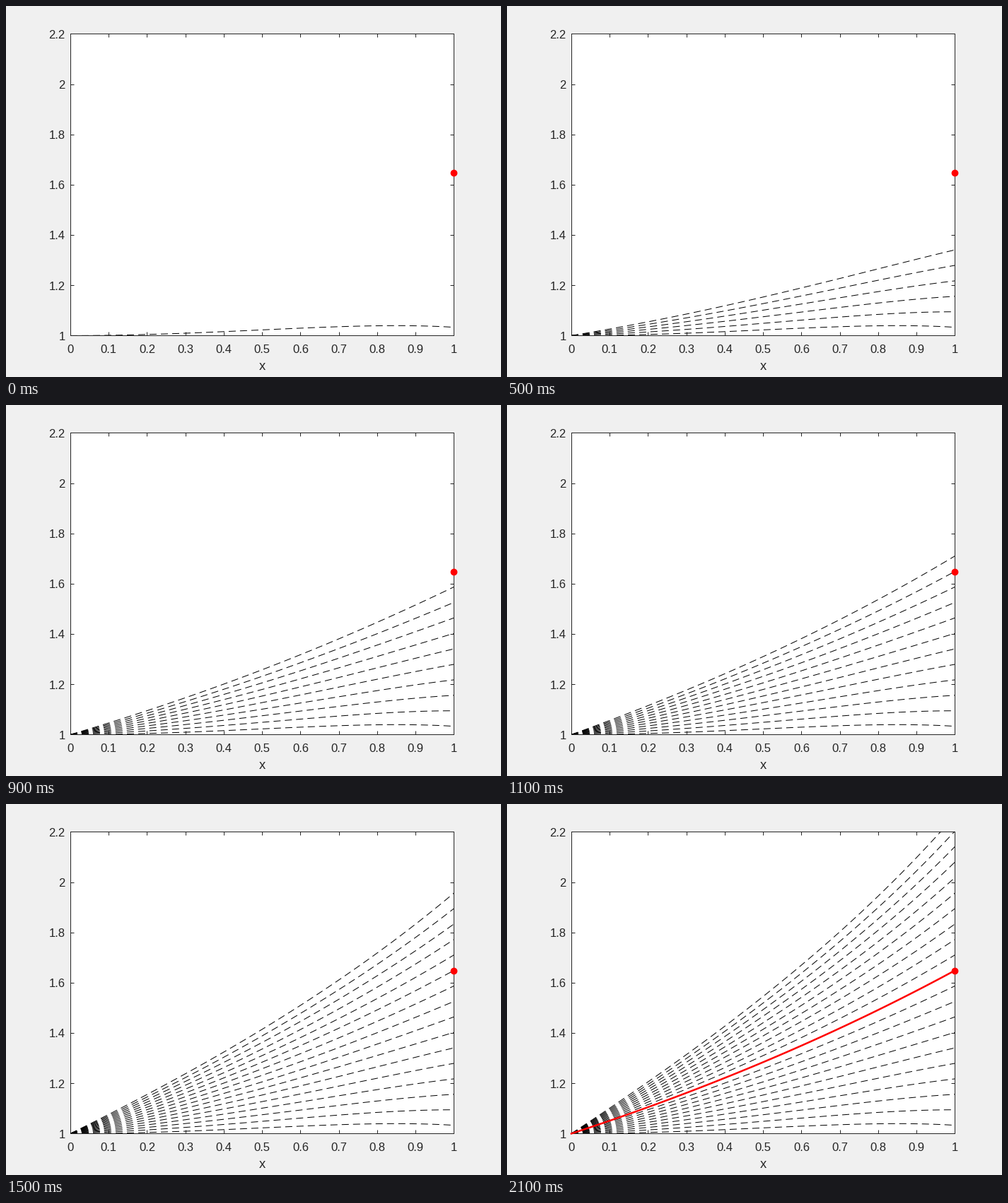
Write a matplotlib script that moves like this. It is 700 by 525 pixels and loops after 2200 ms.

```python
import math

import numpy as np
import matplotlib.pyplot as plt
from matplotlib.animation import FuncAnimation

W, H, DPI = 700, 525, 100
LEFT, RIGHT, TOP, BOTTOM = 91.0, 633.4, 39.4, 466.4
Y_MIN, Y_MAX = 1.0, 2.2
INK = "0.15"
PX = 72 / DPI  # points per pixel

plt.rcParams["font.family"] = "Liberation Sans"

# Shooting method for y'' = (1 + x^2) y - (x^2 + 3/4) exp(x/2), y(0) = 1, y(1) = exp(1/2)
x = np.linspace(0, 1, 101)
exact = np.exp(x / 2)
erf = np.array([math.erf(v) for v in x])
growth = np.exp(x**2 / 2) * math.sqrt(math.pi) / 2 * erf
slopes = np.arange(21) * 0.05


def shoot(slope):
    return exact + (slope - 0.5) * growth


fig = plt.figure(figsize=(W / DPI, H / DPI), dpi=DPI, facecolor="#f0f0f0")
ax = fig.add_axes([LEFT / W, 1 - BOTTOM / H, (RIGHT - LEFT) / W, (BOTTOM - TOP) / H])
ax.set(xlim=(0, 1), ylim=(Y_MIN, Y_MAX))
ax.set_xticks(np.arange(11) / 10)
ax.set_yticks(1 + np.arange(7) / 5)
ax.tick_params(direction="in", length=5 * PX, width=PX, color=INK, top=True,
               right=True, labelbottom=False, labelleft=False)
for spine in ax.spines.values():
    spine.set(linewidth=PX, edgecolor=INK)


def label(px, py, text, ha="center", size=16.67):
    fig.text(px / W, 1 - py / H, text, ha=ha, va="baseline",
             fontsize=size * PX, color=INK)


for v in ax.get_xticks():
    label(LEFT + v * (RIGHT - LEFT), 491, f"{v:g}")
for v in ax.get_yticks():
    py = BOTTOM - (v - Y_MIN) / (Y_MAX - Y_MIN) * (BOTTOM - TOP)
    label(83.5, py + 6.4, f"{v:g}", ha="right")
label(362.5, 515, "x", size=18.33)

shots = [ax.plot(x, shoot(s), color="black", lw=PX, ls=(0, (10, 6)), zorder=3)[0]
         for s in slopes]
solution, = ax.plot(x, exact, color="red", lw=2.5 * PX, zorder=4, clip_on=False)
ax.plot(1, exact[-1], "o", color="red", ms=9.8 * PX, mew=0, zorder=5, clip_on=False)


def update(i):
    for k, shot in enumerate(shots):
        shot.set_visible(k <= i)
    solution.set_visible(i >= len(shots))
    return [*shots, solution]


anim = FuncAnimation(fig, update, frames=len(shots) + 1, interval=100,
                     repeat=True, repeat_delay=0)
plt.show()
```
